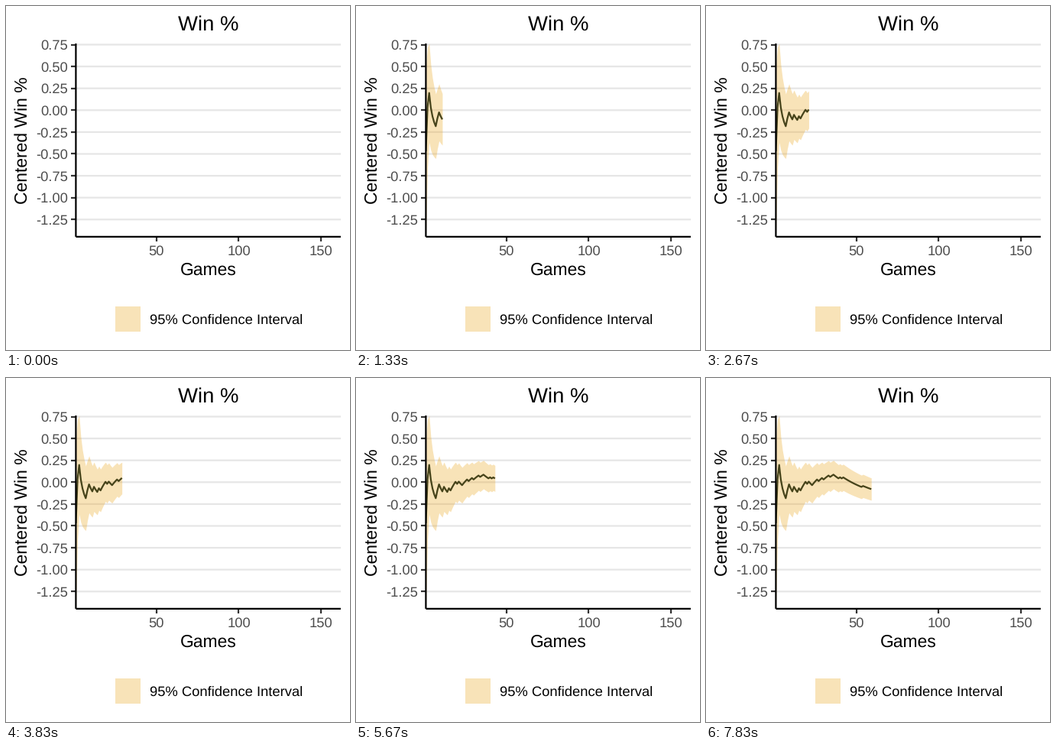
Animation of 450 by 450 pixels, one loop 8000 ms. Source, as a matplotlib script:

```python
import numpy as np
import matplotlib.pyplot as plt
from matplotlib.animation import FuncAnimation
from matplotlib.patches import Rectangle

SIZE, DPI = 450, 150
LOOP, INTERVAL = 8000, 40
STEPS = 48                      # visible reveal steps per loop
SEASON, REVEAL = 162, 130       # games, steps for the whole season
LEFT, RIGHT, TOP, BOTTOM = 91.4, 437.9, 49.1, 301.85
LINE = 1.067
AMBER = (235 / 255, 163 / 255, 22 / 255)

plt.rcParams.update({
    "font.family": "Liberation Sans",
    "text.hinting": "none",
    "path.snap": False,
})

# Running win share, centred on the season's share, with its 95% band
results = "LWWLLLLWWLLWLLWLWWWLWLLWWWLWWLWWWLWWLLLWLWL" + "L" * 10 + "W" + "L" * 5
games = np.arange(1, len(results) + 1)
share = 76 / SEASON
wins = np.cumsum([r == "W" for r in results])
centered = wins / games - share
margin = 1.96 * np.sqrt(share * (1 - share) / games)
low, high = centered - margin, centered + margin

fig = plt.figure(figsize=(SIZE / DPI, SIZE / DPI), dpi=DPI, facecolor="white")
ax = fig.add_axes([LEFT / SIZE, 1 - BOTTOM / SIZE,
                   (RIGHT - LEFT) / SIZE, (BOTTOM - TOP) / SIZE])
ax.set_xlim(1, SEASON)
ax.set_ylim(low.min(), high.max())
ax.set_axisbelow(True)
ax.grid(axis="y", color="#e6e6e6", lw=LINE)


def label(x, y, text, size, color="black", **kw):
    """Place text with its baseline at pixel (x, y), measured from the top left."""
    fig.text(x / SIZE, 1 - y / SIZE, text, size=size, color=color,
             va="baseline", **kw)


x_ticks = [50, 100, 150]
y_ticks = np.arange(-1.25, 0.76, 0.25)
ax.set_xticks(x_ticks, labels=[])
ax.set_yticks(y_ticks, labels=[])
ax.tick_params(length=2.75, width=LINE, color="#333333")
for side, spine in ax.spines.items():
    spine.set_visible(side in ("left", "bottom"))
    spine.set_linewidth(LINE)
    spine.set_capstyle("butt")

x_scale = (RIGHT - LEFT) / (SEASON - 1)
y_scale = (BOTTOM - TOP) / (high.max() - low.min())
for t in x_ticks:
    label(LEFT + (t - 1) * x_scale, 326, str(t), 8.8, "#4d4d4d", ha="center")
for t in y_ticks:
    label(81, BOTTOM - (t - low.min()) * y_scale + 6.6, f"{t:.2f}", 8.8,
          "#4d4d4d", ha="right")

mid_x, mid_y = (LEFT + RIGHT) / 2, (TOP + BOTTOM) / 2
label(mid_x, 32, "Win %", 13.2, ha="center")
label(mid_x, 352, "Games", 11, ha="center")
fig.text(28 / SIZE, 1 - mid_y / SIZE, "Centered Win %", size=11, rotation=90,
         rotation_mode="anchor", ha="center", va="baseline")

fig.add_artist(Rectangle((143 / SIZE, 1 - 426 / SIZE), 33 / SIZE, 33 / SIZE,
                         facecolor=AMBER, alpha=0.3, lw=0))
label(188.5, 416, "95% Confidence Interval", 8.8)

band = ax.fill_between(games, low, high, color=AMBER, alpha=0.3, lw=0, zorder=1)
curve, = ax.plot([], [], color="#46431a", lw=LINE, zorder=2,
                 solid_capstyle="butt", solid_joinstyle="round")


def draw(i):
    step = min(int((i + 1) * INTERVAL * STEPS / LOOP), STEPS - 1)
    n = round(1 + step * (SEASON - 1) / REVEAL)
    x = games[:n]
    band.set_verts([np.concatenate([np.column_stack([x, low[:n]]),
                                    np.column_stack([x, high[:n]])[::-1]])])
    curve.set_data(x, centered[:n])
    return band, curve


anim = FuncAnimation(fig, draw, frames=LOOP // INTERVAL, interval=INTERVAL,
                     repeat=True, repeat_delay=0, blit=False)
plt.show()
```
